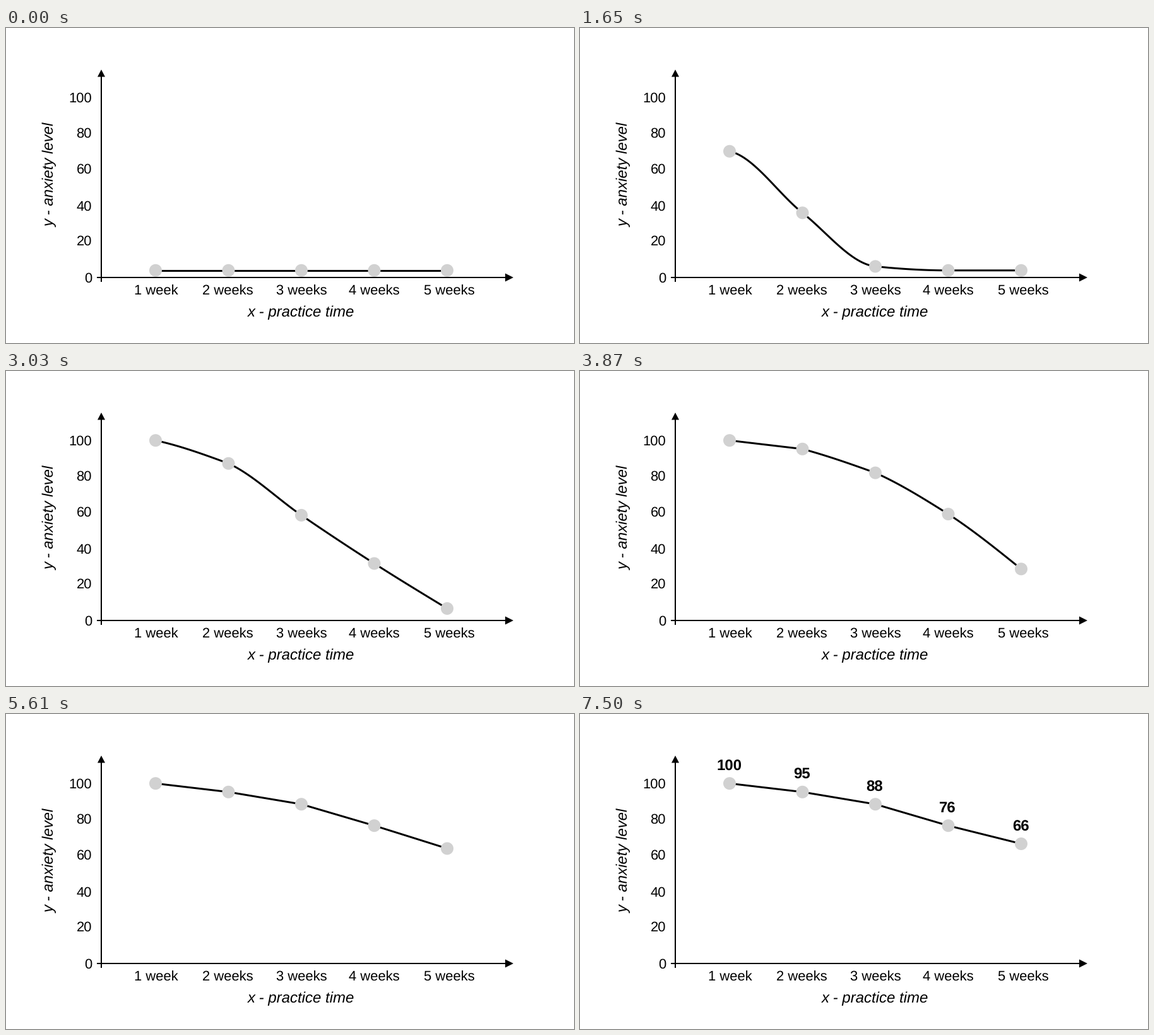
These frames come from a looping animation (900x500 px, 8.52 s). A matplotlib script:

```python
import numpy as np
import matplotlib.pyplot as plt
from matplotlib.animation import FuncAnimation
from matplotlib.patches import Circle, Polygon

W, H, DPI = 900, 500, 100
STEP, LOOP = 30, 8520
PX = 72 / DPI

plt.rcParams["font.family"] = "Liberation Sans"
plt.rcParams["text.hinting"] = "none"
plt.rcParams["toolbar"] = "None"

fig = plt.figure(figsize=(W / DPI, H / DPI), dpi=DPI, facecolor="white")
ax = fig.add_axes([0, 0, 1, 1])
ax.set_xlim(0, W)
ax.set_ylim(H, 0)
ax.axis("off")

# Dots rise one after another from BASE to TOP
X = np.linspace(237, 699, 5)
BASE = 384.8
TOP = np.array([110.2, 123.8, 143.2, 177.2, 206])
START = 254 + 663 * np.arange(5)
SPAN = np.array([2560, 2695, 2860, 2660, 3155])

# Ease: linear departure, soft arrival, as a cubic Bezier (1/6, 1/6, 2/3, 1)
s = np.linspace(0, 1, 400)
EASE_X = .5 * s + s**2 - .5 * s**3
EASE_Y = .5 * s + 2 * s**2 - 1.5 * s**3

u = np.linspace(0, 1, 30)
CURVE_X = np.concatenate([a + (b - a) * u for a, b in zip(X, X[1:])])


def text(x, y, label, size=22, ha="left", **kw):
    return ax.text(x, y, label, fontsize=size * PX, color="black",
                   ha=ha, va="baseline", **kw)


def smooth(t, t0, t1):
    k = min(max((t - t0) / (t1 - t0), 0), 1)
    return k * k * (3 - 2 * k)


def curve(y, rise):
    """Smooth curve through the dots; a part straightens as its right dot settles."""
    dx, dy = np.diff(X), np.diff(y)
    g = dy / dx
    inner = 2 * g[:-1] * g[1:] / (g[:-1] + g[1:] + 1e-9)  # harmonic mean
    m = np.concatenate([[.25 * g[0]], inner, [1.5 * g[-1] - .5 * inner[-1]]])
    parts = []
    for i in range(4):
        bend = u * (1 - u) * ((m[i] * dx[i] - dy[i]) * (1 - u)
                              - (m[i + 1] * dx[i] - dy[i]) * u)
        parts.append(y[i] + dy[i] * u + bend * (1 - rise[i + 1]**6))
    return np.concatenate(parts)


def draw_axes():
    style = dict(color="black", lw=2 * PX, solid_capstyle="butt")
    ax.plot([151, 151], [75, 403], **style)
    ax.plot([144, 793], [396, 396], **style)
    ax.add_patch(Polygon([(151, 66), (145, 77.5), (157, 77.5)], fc="black", lw=0))
    ax.add_patch(Polygon([(804, 396), (791, 389.5), (791, 402.5)], fc="black", lw=0))

    for value, y in zip(range(0, 101, 20), [404, 345, 290, 231, 174, 118]):
        label = str(value)
        text(135.9 - 12.23 * len(label), y, label)
    for n, x in enumerate([203, 311, 428, 543, 662], 1):
        text(x, 424, f"{n} week" + "s" * (n > 1))

    text(383, 458, "x - practice time", 24, style="italic")
    text(76, 316.5, "y - anxiety level", 24, style="italic",
         rotation=90, rotation_mode="anchor")


draw_axes()
line, = ax.plot([], [], color="black", lw=3 * PX, zorder=3)
dots = [ax.add_patch(Circle((x, BASE), 10, fc="#d1d1d1", lw=0, zorder=4)) for x in X]
values = [text(x - 1, y - 20.6, v, 24, ha="center", weight="bold", zorder=5)
          for x, y, v in zip(X, TOP, ["100", "95", "88", "76", "66"])]


def update(i):
    t = i * STEP
    rise = np.interp((t - START) / SPAN, EASE_X, EASE_Y)
    y = BASE + (TOP - BASE) * rise
    line.set_data(CURVE_X, curve(y, rise))
    for dot, x, cy in zip(dots, X, y):
        dot.center = (x, cy)
    fade = smooth(t, 6360, 7500)
    for label in values:
        label.set_alpha(fade)
        label.set_visible(fade > 0)
    return [line, *dots, *values]


anim = FuncAnimation(fig, update, frames=LOOP // STEP, interval=STEP,
                     repeat=True, repeat_delay=0, blit=False)
plt.show()
```
